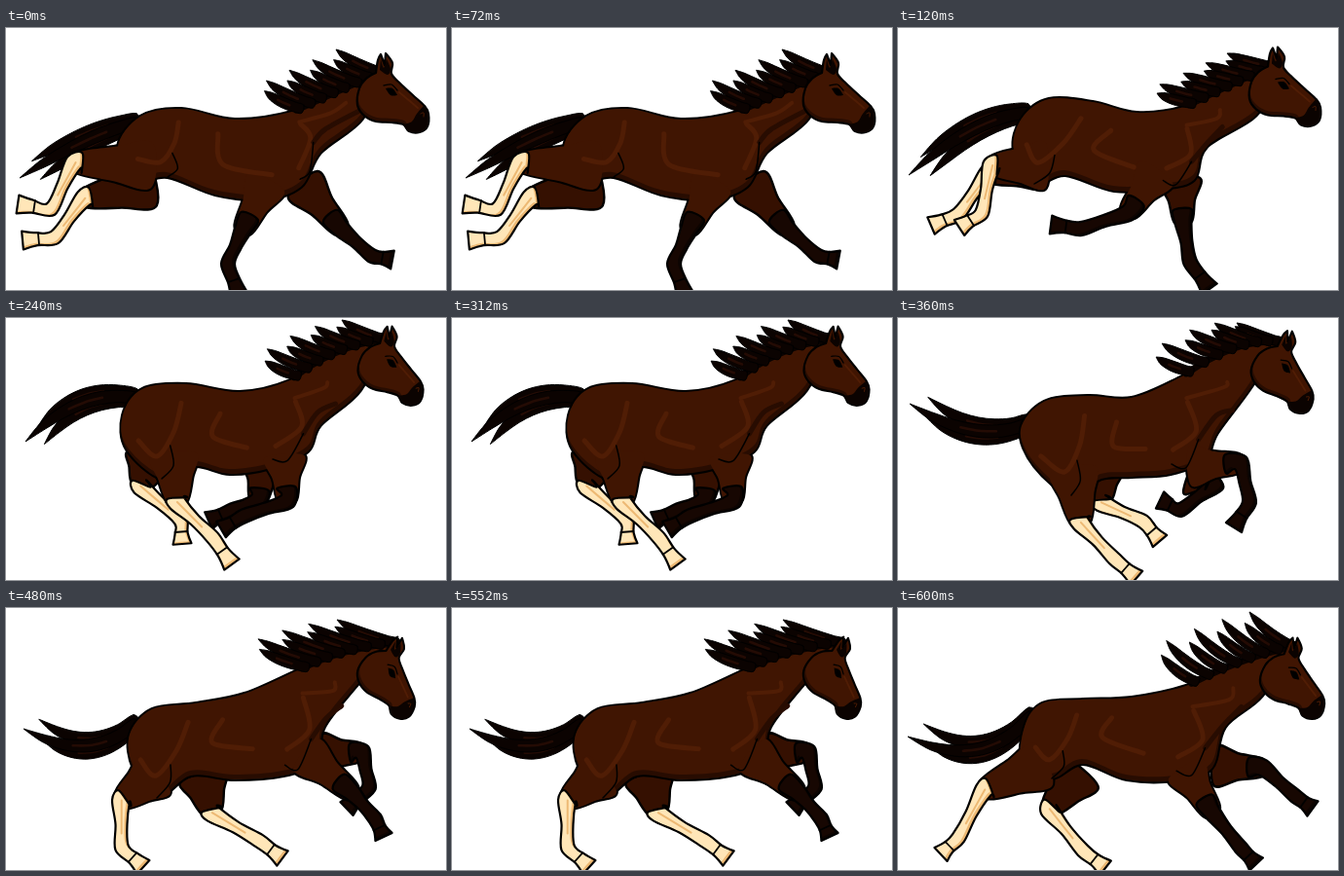
Animation of 452x269 px, one loop 720 ms. Source, as an HTML page:

```html
<!DOCTYPE html>
<html lang="en">
<head>
<meta charset="utf-8">
<title>Galloping horse</title>
<style>
html, body { margin: 0; width: 100%; height: 100%; overflow: hidden; background: #fff; }
svg { display: block; }
</style>
</head>
<body>
<svg id="stage" width="452" height="269" viewBox="0 0 452 269"></svg>
<script>
const STEP = 120;
const COAT = '#401502', FAR = '#351001', SHADE = '#280c01', GLOW = '#501d05';
const HAIR = '#0b0301', STREAK = '#240b04', CREAM = '#ffe6b8', TAN = '#edb974';
const stage = document.getElementById('stage');
let ids = 0;

function add(parent, tag, attrs) {
  const el = document.createElementNS('http://www.w3.org/2000/svg', tag);
  for (const key in attrs) el.setAttribute(key, attrs[key]);
  return parent.appendChild(el);
}

// Points are written "x,y"; a trailing ! makes a sharp corner.
const parse = text => text.split(' ').map(p => {
  const [x, y] = p.split(',').map(parseFloat);
  return { x, y, sharp: p.endsWith('!') };
});
const mix = (a, b, t) => ({ x: a.x + (b.x - a.x) * t, y: a.y + (b.y - a.y) * t });
const bend = (a, c, b, t) => mix(mix(a, c, t), mix(c, b, t), t);
const wide = (p, w, sharp) => ({ ...p, w, sharp });

// Smooth path through points.
function curve(pts, closed) {
  const n = pts.length;
  const at = i => closed ? pts[(i + n) % n] : pts[Math.max(0, Math.min(n - 1, i))];
  const pull = (i, k) => at(i).sharp ? 0 : (at(i + 1)[k] - at(i - 1)[k]) / 6;
  let d = `M${pts[0].x} ${pts[0].y}`;
  for (let i = 0; i < (closed ? n : n - 1); i++) {
    const a = at(i), b = at(i + 1);
    d += `C${a.x + pull(i, 'x')} ${a.y + pull(i, 'y')} ` +
      `${b.x - pull(i + 1, 'x')} ${b.y - pull(i + 1, 'y')} ${b.x} ${b.y}`;
  }
  return closed ? d + 'Z' : d;
}

// Both sides of a spine whose nodes carry their own width.
function sides(nodes) {
  const left = [], right = [];
  nodes.forEach((p, i) => {
    const a = nodes[Math.max(0, i - 1)], b = nodes[Math.min(nodes.length - 1, i + 1)];
    const len = Math.hypot(b.x - a.x, b.y - a.y) || 1;
    const dx = (a.y - b.y) / len * p.w / 2, dy = (b.x - a.x) / len * p.w / 2;
    left.push({ x: p.x + dx, y: p.y + dy, sharp: p.sharp });
    right.unshift({ x: p.x - dx, y: p.y - dy, sharp: p.sharp });
  });
  return [...left, ...right];
}
const tube = nodes => curve(sides(nodes), true);

function stroke(g, d, color, width) {
  add(g, 'path', { d, fill: 'none', stroke: color, 'stroke-width': width,
    'stroke-linecap': 'round', 'stroke-linejoin': 'round' });
}
const fill = (g, d, color) => add(g, 'path', { d, fill: color });

// A form lit from above: the light fill is shifted inside its own outline.
function lit(g, d, dark, light, shift) {
  const id = 'c' + ids++;
  fill(add(g, 'clipPath', { id }), d);
  fill(g, d, dark);
  const inner = add(g, 'g', { 'clip-path': `url(#${id})` });
  fill(inner, d, light).setAttribute('transform', `translate(${shift})`);
}

const hind = { root: 46, thick: 35, joint: 18, from: 0.9, dark: TAN, light: CREAM };
const fore = { root: 40, thick: 27, joint: 17, from: 0.7, dark: '#0d0401', light: '#170702' };

const upper = ([root, joint], kind) => tube([
  wide(root, kind.root), wide(mix(root, joint, 0.5), kind.thick), wide(joint, kind.joint)
]);

function lower(g, [root, joint, fetlock, sole], kind) {
  const d = tube([
    wide(mix(root, joint, kind.from), kind.joint + 2), wide(joint, kind.joint),
    wide(mix(joint, fetlock, 0.5), 12), wide(fetlock, 14),
    wide(mix(fetlock, sole, 0.55), 13), wide(sole, 19, true)
  ]);
  lit(g, d, kind.dark, kind.light, '-3 -2');
  stroke(g, d, '#000', 2.2);
  const hoof = sides([wide(mix(fetlock, sole, 0.5), 13), wide(mix(fetlock, sole, 0.6), 13)]);
  stroke(g, curve([hoof[0], hoof[3]]), '#000', 1.8);
  if (kind === hind) stroke(g, curve([mix(root, joint, 0.98), mix(joint, fetlock, 0.7)]), TAN, 2);
}

function farLeg(g, joints, kind) {
  const d = upper(joints, kind);
  fill(g, d, FAR);
  stroke(g, d, '#000', 2.4);
  lower(g, joints, kind);
}

// A lock of hair that tapers to its tip.
function lock(g, a, c, b, width) {
  const nodes = [];
  for (let t = 0; t <= 1.01; t += 1 / 6) {
    nodes.push(wide(bend(a, c, b, t), width * Math.max(0, 1 - t) ** 0.7 * (0.5 + t), t > 0.99));
  }
  const d = tube(nodes);
  fill(g, d, HAIR);
  stroke(g, d, '#000', 1);
  stroke(g, curve([0.3, 0.45, 0.6].map(t => bend(a, c, b, t))), STREAK, 2.6);
}

function tail(g, [root, ctrl, tip]) {
  const dx = tip.x - root.x, dy = tip.y - root.y;
  for (const k of [-1, 1, 0]) {
    const turn = k * 0.09, size = k ? 0.86 : 1;
    const end = { x: root.x + (dx - dy * turn) * size, y: root.y + (dy + dx * turn) * size };
    lock(g, { x: root.x, y: root.y - k * 4 }, { x: ctrl.x, y: ctrl.y - k * 8 }, end, 21);
  }
}

function mane(g, [poll, crest, withers], [wx, wy]) {
  const ctrl = { x: 2 * crest.x - (poll.x + withers.x) / 2, y: 2 * crest.y - (poll.y + withers.y) / 2 };
  const along = t => bend(poll, ctrl, withers, t);
  stroke(g, curve([0, 0.25, 0.5, 0.75, 0.95].map(along)), HAIR, 7);
  for (let k = 0; k < 8; k++) {
    const p = along(k / 7.5), size = k % 2 ? 0.78 : 1;
    const at = (u, v) => ({ x: p.x + wx * u * size, y: p.y + wy * v * size });
    lock(g, { x: p.x + 5, y: p.y }, at(0.55, 0.3), at(1, 1), 17);
  }
}

function head(g, [x, y, turn, size]) {
  const h = add(g, 'g', { transform: `translate(${x} ${y}) rotate(${turn}) scale(${size}) translate(-422 -97)` });
  const shape = text => curve(parse(text), true);
  const line = (text, color, width) => stroke(h, curve(parse(text)), color, width);
  const face = shape('380,46! 382,33 385,27! 389,38! 390,26! 397,36 396,47 405,57 418,69 ' +
    '430,80 434,88 433,101 425,107 414,106 408,99 396,97 380,96 368,90 361,79 363,62 370,52');
  lit(h, face, SHADE, COAT, '1 -4');
  stroke(h, face, '#000', 2.2);
  line('404,66 416,76 423,82', GLOW, 2);
  fill(h, shape('429,80! 434,88 433,101 425,107 414,106 408,99! 417,96 422,88'), HAIR);
  fill(h, shape('390,62! 397,62 402,69! 395,69'), '#000');
  line('388,59 396,58 402,64', '#000', 1.3);
  fill(h, shape('384,43! 385,32! 388,41 391,32! 395,42 392,48'), HAIR);
  line('426,88 429,87 429,91', GLOW, 1);
}

// Muscles placed between the landmarks of the body.
function muscles(g, body) {
  const [poll, crest, withers, back, croup, dock, rump, , flank, rib, belly, elbow, chest, throat] = body;
  const mark = (color, width, ...pts) => stroke(g, curve(pts), color, width);
  mark(GLOW, 5, mix(croup, flank, 0.2), mix(croup, flank, 0.5), mix(dock, flank, 0.75), mix(rump, flank, 0.4));
  mark(GLOW, 5, mix(back, flank, 0.25), mix(back, rib, 0.6), mix(withers, belly, 0.72));
  mark(GLOW, 5, mix(withers, chest, 0.3), mix(withers, chest, 0.65), mix(withers, elbow, 0.75));
  mark(GLOW, 4, mix(crest, throat, 0.4), mix(crest, chest, 0.35), mix(withers, chest, 0.25));
  mark(SHADE, 5, mix(poll, throat, 0.75), mix(crest, chest, 0.6), mix(withers, chest, 0.75));
  mark('#000', 1.5, mix(croup, flank, 0.65), mix(back, flank, 0.85), flank);
  mark('#000', 1.5, mix(withers, chest, 0.75), mix(elbow, chest, 0.45), mix(withers, elbow, 0.9));
}

// Body: poll, crest, withers, back, croup, dock, rump, thigh, flank, rib, belly, elbow, chest, throat.
// Legs: root, knee or hock, fetlock, sole. Head: muzzle, turn, size.
const poses = [
  {
    body: '383,46 338,66 294,86 235,94 180,83 138,91 115,122 130,157 166,153 215,171 265,176 303,163 323,128 366,93',
    head: [422, 97, 0, 1], wind: [-44, -24], tail: '135,97 85,108 14,154',
    nearHind: '150,141 70,138 46,186 12,181', farHind: '150,160 80,175 50,215 17,218',
    nearFore: '268,158 243,208 228,242 240,276', farFore: '305,160 345,207 376,234 397,238'
  },
  {
    body: '382,40 340,59 294,81 245,87 200,76 155,73 127,93 119,126 140,160 172,151 222,167 270,165 304,156 317,122 370,87',
    head: [422, 90.5, 0, 1], wind: [-44, -14], tail: '134,87 80,90 11,151',
    nearHind: '152,141 96,141 86,190 63,205', farHind: '145,140 92,150 62,191 34,203',
    nearFore: '266,148 236,190 188,206 157,202', farFore: '290,155 293,200 300,240 320,268'
  },
  {
    body: '385,22 335,37 292,64 240,76 185,68 140,73 120,100 124,135 160,165 194,152 230,160 272,154 310,137 323,110 364,74',
    head: [416, 80, 9, 0.95], wind: [-40, -20], tail: '134,82 75,72 20,127',
    nearHind: '172,140 176,190 212,225 232,253', farHind: '148,145 138,173 179,207 181,232',
    nearFore: '286,142 289,188 245,203 221,217', farFore: '265,150 259,187 233,197 208,208'
  },
  {
    body: '390,25 345,31 290,61 240,82 195,80 150,86 126,115 140,152 178,182 209,165 240,163 280,160 315,146 328,118 362,72',
    head: [413, 88, 18, 0.96], wind: [-42, -20], tail: '135,108 80,132 12,88',
    nearHind: '180,155 188,211 222,247 245,267', farHind: '205,160 209,190 252,209 269,229',
    nearFore: '300,152 352,149 361,189 345,215', farFore: '300,160 327,170 290,197 269,187'
  },
  {
    body: '398,36 345,46 300,64 245,88 195,98 150,104 127,130 131,165 155,195 190,172 235,176 285,172 318,158 327,122 358,82',
    head: [406, 104, 25, 0.94], wind: [-58, -24], tail: '134,118 85,162 18,124',
    nearHind: '155,170 118,198 119,246 141,266', farHind: '202,172 212,211 260,239 284,257',
    nearFore: '308,150 356,190 379,216 388,235', farFore: '325,150 366,148 373,184 350,206'
  },
  {
    body: '403,40 350,56 296,80 240,92 190,94 148,98 130,122 128,160 158,175 190,160 235,176 285,177 322,165 336,122 374,90',
    head: [425, 104, 13, 0.96], wind: [-42, -36], tail: '138,110 86,170 10,132',
    nearHind: '150,160 88,187 62,236 44,253', farHind: '188,168 155,207 190,249 213,267',
    nearFore: '295,165 323,210 352,246 368,263', farFore: '325,162 375,164 408,193 426,206'
  }
];

function horse(pose) {
  const g = add(stage, 'g', { visibility: 'hidden' });
  const body = parse(pose.body);
  const trunk = curve(body, true);
  const nearHind = parse(pose.nearHind), nearFore = parse(pose.nearFore);
  const limbs = [upper(nearHind, hind), upper(nearFore, fore)];

  tail(g, parse(pose.tail));
  farLeg(g, parse(pose.farHind), hind);
  farLeg(g, parse(pose.farFore), fore);
  // Outlines lie under the fills, so trunk and limbs share one contour.
  for (const d of [trunk, ...limbs]) stroke(g, d, '#000', 4);
  lit(g, trunk, SHADE, COAT, '-1 -5');
  for (const d of limbs) fill(g, d, COAT);
  muscles(g, body);
  lower(g, nearHind, hind);
  lower(g, nearFore, fore);
  mane(g, body, pose.wind);
  head(g, pose.head);
  return g;
}

const groups = poses.map(horse);

function update(time) {
  const now = Math.floor(time / STEP) % groups.length;
  groups.forEach((g, i) => g.setAttribute('visibility', i === now ? 'visible' : 'hidden'));
}

const start = performance.now();
function tick() {
  update(performance.now() - start);
  requestAnimationFrame(tick);
}
tick();
</script>
</body>
</html>
```
